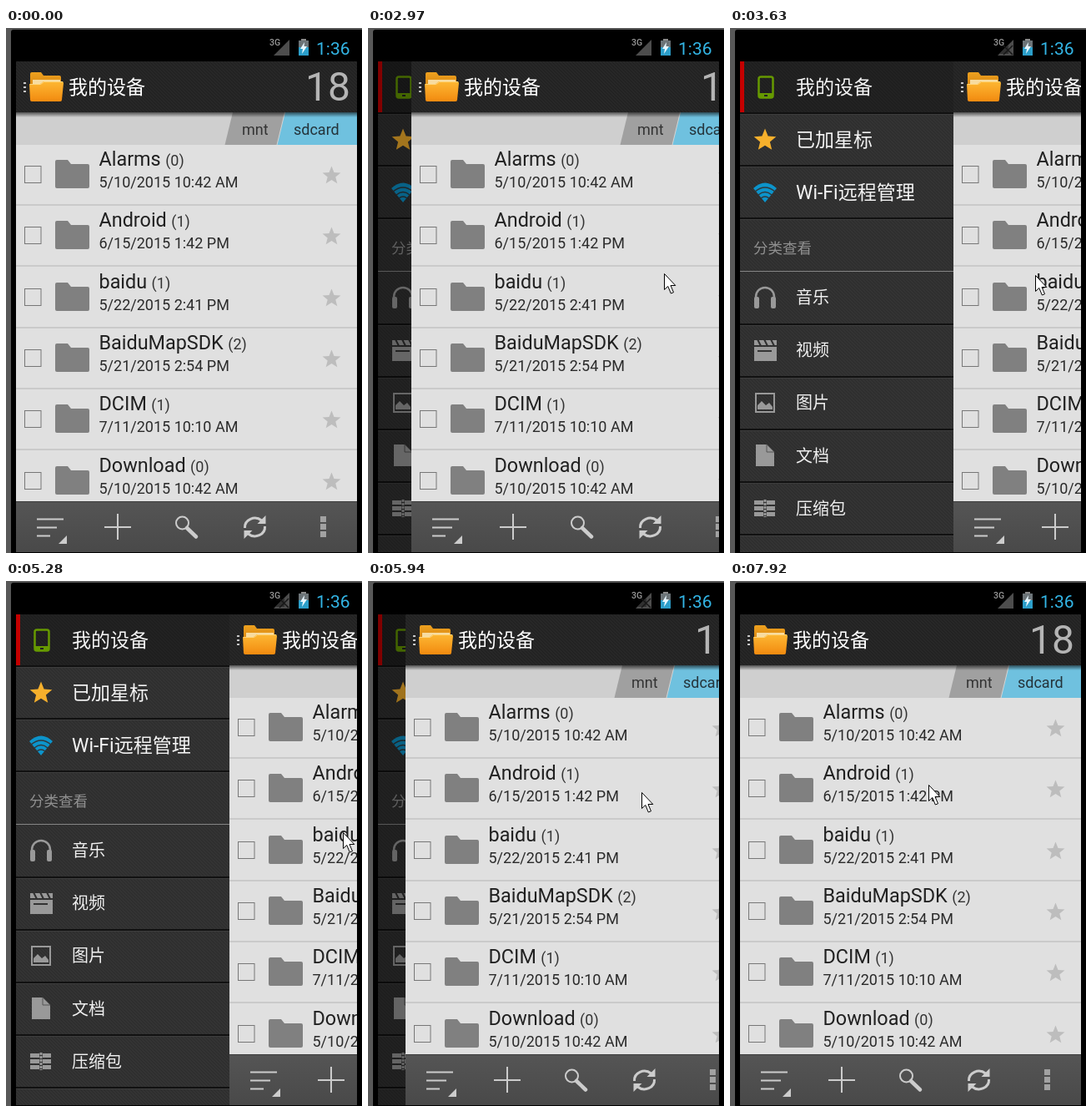
An HTML page for the animation above (8000 ms loop, 427x629 px).

```html
<!DOCTYPE html>
<html lang="zh-CN">
<head>
<meta charset="utf-8">
<title>File manager drawer</title>
<style>
html, body { margin: 0; width: 100%; height: 100%; overflow: hidden; background: #000; }
svg { display: block; width: 427px; height: 629px; }
text { font-family: Roboto, "Noto Sans CJK SC", "Noto Sans CJK", sans-serif; white-space: pre; }
</style>
</head>
<body>
<svg id="stage" viewBox="0 0 427 629" xmlns="http://www.w3.org/2000/svg"></svg>
<script>
const LOOP = 8000;

// [start ms, cursor x, cursor y, panel offset]; a null x hides the cursor
const STEPS = [
  [0, null, 0, 0],
  [660, 239, 331, 0],
  [990, null, 0, 0],
  [1650, 140, 257, 0],
  [1980, 29, 288, 0],
  [2310, 41, 288, 0],
  [2640, 247, 294, 40],
  [2970, 355, 294, 40],
  [3300, 356, 295, 98],
  [3630, 366, 296, 256],
  [3960, 376, 298, 256],
  [4620, 338, 299, 256],
  [4950, 385, 299, 256],
  [5280, 404, 301, 256],
  [5610, 385, 290, 236],
  [5940, 328, 253, 33],
  [6270, 262, 270, 2],
  [6600, 201, 283, 0],
  [6930, 278, 278, 0],
  [7260, 246, 237, 0],
  [7590, 237, 237, 0],
  [7920, 238, 244, 0]
];
const DATA_ACTIVE = [3300, 7920];
const OPEN = 256;
const ROW_HEIGHT = 73.3;

const FILES = [
  ['Alarms', 0, '5/10/2015 10:42 AM'],
  ['Android', 1, '6/15/2015 1:42 PM'],
  ['baidu', 1, '5/22/2015 2:41 PM'],
  ['BaiduMapSDK', 2, '5/21/2015 2:54 PM'],
  ['DCIM', 1, '7/11/2015 10:10 AM'],
  ['Download', 0, '5/10/2015 10:42 AM']
];

const rect = (x, y, w, h, fill, more = '') =>
  `<rect x="${x}" y="${y}" width="${w}" height="${h}" fill="${fill}" ${more}/>`;
const frame = (x, y, w, h, color, width, more = '') =>
  rect(x, y, w, h, 'none', `stroke="${color}" stroke-width="${width}" ${more}`);
const path = (d, fill, more = '') => `<path d="${d}" fill="${fill}" ${more}/>`;
const line = (d, color, width, more = '') =>
  path(d, 'none', `stroke="${color}" stroke-width="${width}" ${more}`);
const text = (x, y, size, fill, body, more = '') =>
  `<text x="${x}" y="${y}" font-size="${size}" fill="${fill}" ${more}>${body}</text>`;
const at = (x, y, body) => `<g transform="translate(${x} ${y})">${body}</g>`;

function star(cx, cy, r, fill) {
  const points = Array.from({ length: 10 }, (_, i) => {
    const a = i * Math.PI / 5 - Math.PI / 2, d = i % 2 ? r * 0.44 : r;
    return `${(cx + d * Math.cos(a)).toFixed(1)},${(cy + d * Math.sin(a)).toFixed(1)}`;
  });
  return `<polygon points="${points.join(' ')}" fill="${fill}"/>`;
}

const hatch = (id, base, dark) => `
  <pattern id="${id}" width="4" height="4" patternUnits="userSpaceOnUse">
    ${rect(0, 0, 4, 4, base)}
    ${line('M-1 -1L5 5M-1 3L1 5M3 -1L5 1', dark, 1)}
  </pattern>`;
const fade = (id, from, to) => `
  <linearGradient id="${id}" x2="0" y2="1">
    <stop stop-color="${from}"/><stop offset="1" stop-color="${to}"/>
  </linearGradient>`;

const defs = `<defs>
  ${hatch('headHatch', '#272727', '#1f1f1f')}
  ${hatch('menuHatch', '#333', '#2b2b2b')}
  ${fade('back', '#eda11f', '#c97208')}
  ${fade('front', '#fdb833', '#f28a0f')}
  ${fade('shade', '#0009', '#0000')}
  ${fade('bar', '#555', '#494949')}
  <clipPath id="screen">${rect(12, 40, 409, 588, '#000')}</clipPath>
</defs>`;

const statusBar =
  text(316, 21, 10.5, '#999', '3G', 'font-weight="500"') +
  path('M321 33L340 14V33Z', '#4d4d4d') +
  `<g id="data">${path('M323 31L334 20V31Z', '#303030')}${line('M328 21L339 32M339 21L328 32', '#171717', 1.5)}</g>` +
  rect(354, 13, 6, 3, '#8a8a8a') + rect(351, 15, 12, 18, '#6c7478') +
  rect(351, 23, 12, 10, '#2c9fca') +
  path('M358 17L353 25H356L355 31L361 22H357.5Z', '#e8f7ff') +
  text(372, 32, 21, '#33b5e5', '1:36');

function menuIcons() {
  const c = '#999';
  const phone = frame(34.5, 58.5, 17, 25, '#669900', 2.5, 'rx="2.5"') +
    rect(35, 78, 16, 5, '#669900') + rect(41, 80, 4, 2, '#222');
  const wifi = path('M42 209L28 192Q42 179 56 192Z', '#0c94cb') +
    line('M30 196Q42 186 54 196M34 200Q42 193 50 200M37 204Q42 200 47 204', '#30383c', 1.5);
  const headphones = line('M31 329V322A11 11 0 0 1 53 322V329', c, 2.5) +
    rect(29, 322, 6, 14, c, 'rx="2"') + rect(49, 322, 6, 14, c, 'rx="2"');
  const clapper = rect(29, 382, 27, 17, c) + rect(29, 374, 27, 6, c) +
    line('M33 373L37 381M41 373L45 381M49 373L53 381', '#303030', 2) + rect(33, 386, 17, 2, '#333');
  const picture = frame(31, 438, 22, 22, c, 2) +
    path('M33 457V452L38 447L43 452L47 449L51 454V457Z', c);
  const doc = path('M31 499H44L53 508V525H31Z', c) + line('M44 499V508H53', '#555', 1);
  const archive = [566, 573, 580].map(y => rect(29, y, 11, 5, c) + rect(44, y, 10, 5, c)).join('') +
    line('M42 565V586', c, 3, 'stroke-dasharray="3 1"');
  return phone + star(42, 134.5, 14, '#f6b02c') + wifi + headphones + clapper + picture + doc + archive;
}

function menu() {
  const big = ['我的设备', '已加星标', 'Wi-Fi远程管理'];
  const small = ['音乐', '视频', '图片', '文档', '压缩包'];
  const rules = [101, 164, 227, 354, 417, 480, 543, 606];
  return rect(12, 40, 256, 588, 'url(#menuHatch)') +
    rect(12, 40, 256, 61, '#000', 'opacity=".34"') + rect(12, 40, 5, 61, '#c40000') +
    rules.map(y => rect(12, y, 256, 2, '#111') + rect(12, y + 2, 256, 1, '#3d3d3d')).join('') +
    rect(12, 291, 256, 1, '#858585') +
    big.map((s, i) => text(79, 79 + i * 63, 23, '#f4f4f4', s)).join('') +
    text(28, 270, 17.5, '#909090', '分类查看') +
    small.map((s, i) => text(79, Math.round(330 + i * 63.2), 20, '#f0f0f0', s)).join('') +
    menuIcons();
}

const header = rect(12, 40, 409, 61, 'url(#headHatch)') +
  [65, 70, 75].map(y => rect(21, y, 3, 2, '#c8c8c8')).join('') +
  path('M29 55Q29 53 31 53H42L45 57H64Q66 57 66 59V84H29Z', 'url(#back)') +
  path('M32 62H65V68H32Z', '#f7dca0') +
  path('M28 67H41L45 64H67Q69 64 69 66L67 86Q67 88 65 88H31Q29 88 29 86Z', 'url(#front)') +
  line('M29 67.5H41.5L45.5 64.5H68', '#ffd67c', 1) +
  text(75, 79, 23, '#fff', '我的设备') +
  text(359, 87, 48, '#b4b4b4', '18');

const crumbs = rect(12, 101, 409, 39, '#cfcfcf') +
  path('M272 101H335L325.5 140H262.5Z', '#a0a0a0') +
  path('M334.5 101H421V140H325Z', '#6fc1df') +
  line('M334.5 101L325 140', '#d4d4d4', 1) +
  rect(12, 101, 409, 6, 'url(#shade)') +
  text(283, 128, 18, '#333', 'mnt') + text(345, 128, 18, '#24333a', 'sdcard');

const fileRow = ([name, count, date], i) => at(0, Math.round(i * ROW_HEIGHT),
  frame(22.5, 165.5, 19.5, 20, '#777', 1) +
  path('M59 160Q59 158 61 158H74L78 163H98Q100 163 100 165V190Q100 192 98 192H61Q59 192 59 190Z', '#808080') +
  text(111.5, 165, 23.4, '#202020', `${name}<tspan dx="1" font-size="18" fill="#333"> (${count})</tspan>`) +
  text(111.5, 191, 18, '#2a2a2a', date) +
  star(390.5, 177, 11.5, '#bdbdbd') +
  rect(12, 211, 409, 2, '#cacaca'));

const refreshArm = line('M-12 1A12 11 0 0 1 8 -8', '#ccc', 3) + path('M13 -14V-4H3Z', '#ccc');
const toolbar = rect(12, 567, 409, 61, 'url(#bar)') + rect(12, 567, 409, 1, '#3c3c3c') +
  line('M37 588.5H69M37 598.5H61M37 608.5H53', '#ccc', 2) + path('M73 608V618H63Z', '#ccc') +
  line('M118 598H150M134 582V613', '#ccc', 2) +
  `<circle cx="211.5" cy="593" r="7.5" fill="none" stroke="#ccc" stroke-width="2"/>` +
  line('M217 599L228 609.5', '#ccc', 4.5, 'stroke-linecap="round"') +
  at(298.5, 598, refreshArm + `<g transform="rotate(180)">${refreshArm}</g>`) +
  [585, 594, 603].map(y => rect(377, y, 7, 7, '#a2a2a2')).join('');

const panel = rect(12, 140, 409, 428, '#e0e0e0') + FILES.map(fileRow).join('') + crumbs + header + toolbar;

const cursor = path('M.5 .5V19.5L4.8 15.5L8.3 24L11.5 22.7L8 14.5H13.8Z', '#fff', 'stroke="#000" stroke-width="1"');

const stage = document.getElementById('stage');
stage.innerHTML = defs +
  rect(0, 0, 427, 629, '#585858') +
  path('M6 629V5Q6 2 9 2H427V629Z', '#000') +
  statusBar +
  `<g clip-path="url(#screen)">
    ${menu()}
    ${rect(12, 40, 256, 588, '#000', 'id="scrim"')}
    <g id="panel">${panel}</g>
  </g>
  <g id="cursor">${cursor}</g>`;

const $ = id => document.getElementById(id);
const parts = { data: $('data'), scrim: $('scrim'), panel: $('panel'), cursor: $('cursor') };

function draw(t) {
  const [, x, y, offset] = STEPS.findLast(step => step[0] <= t);
  const active = t >= DATA_ACTIVE[0] && t < DATA_ACTIVE[1];
  parts.panel.setAttribute('transform', `translate(${offset} 0)`);
  parts.scrim.setAttribute('opacity', 0.4 * (1 - offset / OPEN));
  parts.data.setAttribute('visibility', active ? 'visible' : 'hidden');
  parts.cursor.setAttribute('visibility', x === null ? 'hidden' : 'visible');
  parts.cursor.setAttribute('transform', `translate(${x ?? 0} ${y})`);
}

const start = performance.now();
function tick() {
  draw((performance.now() - start) % LOOP);
  requestAnimationFrame(tick);
}
draw(0);
requestAnimationFrame(tick);
</script>
</body>
</html>
```
